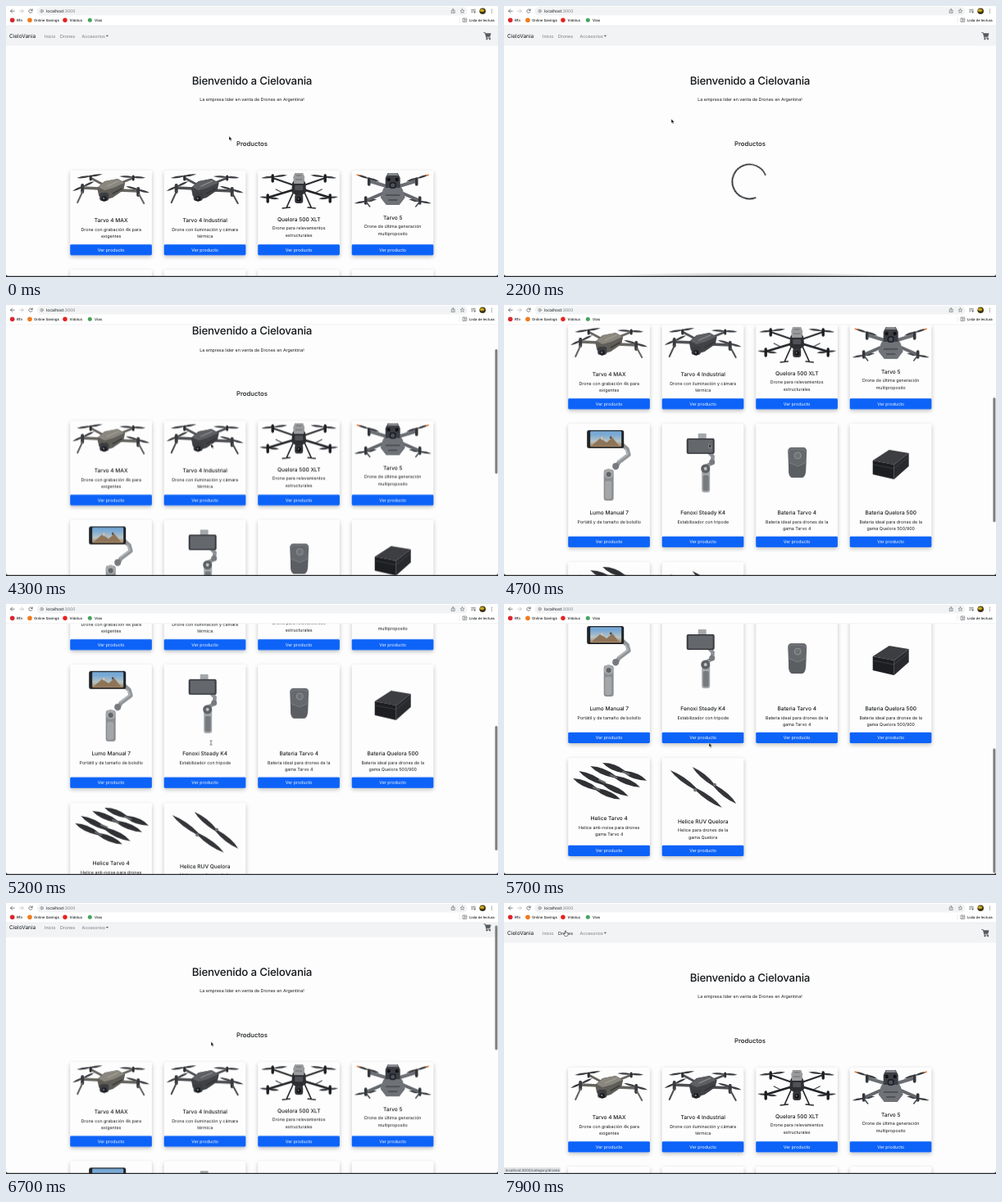
Write an HTML page that moves like this. It is 600 px wide and 331 px high and loops after 8 s.

```html
<!DOCTYPE html>
<html lang="es">
<head>
<meta charset="utf-8">
<title>CieloVania</title>
<style>
@property --scroll { syntax: "<number>"; inherits: true; initial-value: 0; }
html, body { margin: 0; width: 100%; height: 100%; overflow: hidden; background: #fdfdfd; }
svg { display: block; width: 100vw; height: 100vh; }
#stage { animation: scroll 8s linear infinite; }
text { font-family: Inter, "Open Sans", sans-serif; fill: #15181b; text-rendering: geometricPrecision; }
.mid { text-anchor: middle; }
.h1 { font-size: 13.33px; font-weight: 500; letter-spacing: -.22px; }
.h2 { font-size: 7.8px; font-weight: 500; }
.name { font-size: 6.55px; font-weight: 500; }
.body { font-size: 5.33px; }
.small { font-size: 4.35px; font-weight: 500; }
.muted { fill: #75777a; }
.white { fill: #fff; }
.card { fill: #fdfdfd; filter: drop-shadow(0 2.6px 2.8px rgba(0, 0, 0, .24)); }
.line { fill: none; stroke-linecap: round; stroke-linejoin: round; }

#page { transform: translateY(calc(var(--scroll) * -1px)); }
#thumb { transform: translateY(calc(var(--scroll) * .503px)); animation: thumb 8s linear infinite; }
#products { animation: loaded 8s step-end infinite; }
#loading { animation: loading 8s step-end infinite; }
#spinner { transform-origin: 299.5px 214.5px; animation: spin 8s linear infinite; }
#pointer { animation: move 8s linear infinite; }
#arrow { animation: arrow 8s step-end infinite; }
#beam { animation: beam 8s step-end infinite; }
#hand, #status { animation: hover 8s step-end infinite; }
#drones { animation: darken 8s step-end infinite; }

@keyframes scroll {
  0%, 50% { --scroll: 0; animation-timing-function: ease-in; }
  54% { --scroll: 66; }
  58.75% { --scroll: 177; }
  65% { --scroll: 248; animation-timing-function: ease-out; }
  70%, 72.5% { --scroll: 303; animation-timing-function: ease-in; }
  76.25% { --scroll: 207.5; animation-timing-function: ease-out; }
  85%, 100% { --scroll: 0; }
}
@keyframes thumb { 0%, 50% { opacity: 0; } 51%, 89% { opacity: 1; } 92%, 100% { opacity: 0; } }
@keyframes loaded { 0% { opacity: 1; } 16.25% { opacity: 0; } 42.5%, 100% { opacity: 1; } }
@keyframes loading { 0% { opacity: 0; } 16.25% { opacity: 1; } 42.5%, 100% { opacity: 0; } }
@keyframes spin { from { transform: rotate(-1033deg); } to { transform: rotate(2807deg); } }
@keyframes move {
  0%, 1.25% { transform: translate(272px, 159px); }
  5% { transform: translate(97px, 61px); animation-timing-function: ease-out; }
  8.75%, 18.75% { transform: translate(30px, 6px); animation-timing-function: ease-in-out; }
  27.5% { transform: translate(204px, 138px); animation-timing-function: ease-in-out; }
  37.5%, 86.25% { transform: translate(250px, 169.5px); animation-timing-function: ease-in-out; }
  95%, 100% { transform: translate(75px, 34px); }
}
@keyframes arrow { 0% { opacity: 1; } 63.5% { opacity: 0; } 67.5% { opacity: 1; } 95%, 100% { opacity: 0; } }
@keyframes beam { 0% { opacity: 0; } 63.5% { opacity: 1; } 67.5%, 100% { opacity: 0; } }
@keyframes hover { 0% { opacity: 0; } 95%, 100% { opacity: 1; } }
@keyframes darken { 0% { fill: #75777a; } 95%, 100% { fill: #15181b; } }
</style>
</head>
<body>
<svg id="stage" viewBox="0 0 600 331" preserveAspectRatio="none">
  <defs>
    <linearGradient id="photo" x2="0" y2="1">
      <stop offset=".2" stop-color="#78a9d6"/><stop offset=".65" stop-color="#b9c4c4"/><stop offset="1" stop-color="#a8825c"/>
    </linearGradient>
    <radialGradient id="dock"><stop stop-color="#777" stop-opacity=".65"/><stop offset=".6" stop-color="#999" stop-opacity=".35"/><stop offset="1" stop-color="#aaa" stop-opacity="0"/></radialGradient>
  </defs>
  <rect width="600" height="331" fill="#fdfdfd"/>

  <g id="page">
    <rect y="24" width="600" height="24.5" fill="#f1f3f5"/>
    <text x="4" y="38.8" style="font-size:6.5px">CieloVania</text>
    <g class="body">
      <text class="muted" x="47" y="38.6">Inicio</text>
      <text id="drones" x="66" y="38.6">Drones</text>
      <text class="muted" x="92.5" y="38.6">Accesorios</text>
    </g>
    <path d="M121.7 35.8h3.4l-1.7 1.9z" fill="#666"/>
    <g stroke="#55595d" fill="#55595d">
      <path class="line" d="M582.8 32.6h1.6l1.6 6.4h4.6" stroke-width=".9"/>
      <path d="M584.8 33.6h6.4l-1.1 3.9h-4.4z" stroke-width=".5"/>
      <circle cx="586.4" cy="40.2" r=".7"/><circle cx="590" cy="40.2" r=".7"/>
    </g>
    <text class="h1 mid" x="300" y="95.6">Bienvenido a Cielovania</text>
    <text class="body mid" x="300" y="116.2">La empresa lider en venta de Drones en Argentina!</text>
    <text class="h2 mid" x="300" y="170.6">Productos</text>
    <g id="products"></g>
  </g>

  <g id="loading">
    <path id="spinner" class="line" style="stroke-linecap:butt" stroke="#212529" stroke-width="1.7" d="M314.3 229.3A21 21 0 1 1 314.3 199.7"/>
    <ellipse cx="298" cy="331" rx="195" ry="6" fill="url(#dock)"/>
  </g>
  <rect id="thumb" x="596.4" y="24" width="3" height="152" rx="1.5" fill="#7d7d7d"/>

  <g id="toolbar">
    <rect width="600" height="24" fill="#fff"/>
    <path d="M0 23.8H600" stroke="#e3e5e8" stroke-width=".5"/>
    <rect x="37.5" y="1" width="525" height="10.4" rx="5.2" fill="#f1f3f4"/>
    <g class="line" stroke="#55585c" stroke-width=".75">
      <path d="M10.2 6.2H5.6M7.7 4L5.5 6.2l2.2 2.2"/>
      <path d="M16.6 6.2h4.6M19.1 4l2.2 2.2-2.2 2.2" stroke="#babcbe"/>
      <path d="M32 5.2A2.2 2.2 0 1 0 32 7.2M32.2 3.8v1.7h-1.7"/>
      <circle cx="43.6" cy="6.2" r="1.8" stroke-width=".5"/><path d="M43.6 6.1v.9M43.6 5.2v.05" stroke-width=".5"/>
      <path d="M544 5.5h-.8v3h4v-3h-.8M545.2 7.2V3.6M544.1 4.6l1.1-1.1 1.1 1.1" stroke-width=".55"/>
      <path d="M556.5 3.7l.75 1.6 1.75.2-1.3 1.2.35 1.7-1.55-.85-1.55.85.35-1.7-1.3-1.2 1.75-.2z" stroke-width=".5"/>
      <path d="M567.6 4.4h3.4M567.6 6h3.4M567.6 7.6h1.6M572 4v3.6" stroke-width=".6"/>
      <circle cx="571.4" cy="7.8" r=".5"/>
      <path d="M592.4 4.2v.05M592.4 6.2v.05M592.4 8.2v.05" stroke-width="1"/>
      <path d="M557.2 15h4.6v4.4h-4.6zM558.7 15v4.4M559.5 16.5h1.6M559.5 18h1.6" stroke-width=".5"/>
      <path d="M553 14v6.5" stroke="#d5d7da" stroke-width=".5"/>
    </g>
    <circle cx="581.2" cy="6.2" r="3.8" fill="#3d3616"/><ellipse cx="580.6" cy="5.4" rx="2.7" ry="1.8" fill="#c9a51c"/>
    <text x="49" y="8" style="font-size:5px">localhost<tspan class="muted">:3000</tspan></text>
    <circle cx="7.7" cy="17.2" r="2.8" fill="#d9272e"/>
    <circle cx="29" cy="17.2" r="2.8" fill="#f07a1b"/>
    <circle cx="72" cy="17.2" r="2.7" fill="#e8201c"/>
    <circle cx="102.3" cy="17.2" r="2.5" fill="#43a45c"/>
    <g class="small">
      <text x="13" y="18.8">Rfn</text><text x="34" y="18.8">Online Savings</text>
      <text x="77.5" y="18.8">Vidolux</text><text x="108" y="18.8">Vias</text>
      <text x="565" y="18.8" style="font-size:4.2px">Lista de lectura</text>
    </g>
  </g>

  <path d="M0 327.5Q0 329.8 2.5 329.8H597.5Q600 329.8 600 327.5V331H0z" fill="#25272a"/>
  <g id="status">
    <path d="M0 323H67.5Q69 323 69 324.5V330H0z" fill="#dfe2e6"/>
    <text class="small" x="1.8" y="328.2" style="fill:#44484e;font-weight:400">localhost:3000/category/drones</text>
  </g>

  <g id="pointer">
    <path id="arrow" d="M0 0V5.1L1.2 4.1 2 6 3 5.6 2.2 3.8H3.8z" fill="#111" stroke="#fff" stroke-width=".35"/>
    <path id="beam" class="line" d="M-1.2-2.6Q0-2.6 0-1.9Q0-2.6 1.2-2.6M0-1.9V1.9M-1.2 2.6Q0 2.6 0 1.9Q0 2.6 1.2 2.6" stroke="#333" stroke-width=".6"/>
    <path id="hand" d="M-.6 0Q0-.6.5 0V2.1Q2.6 2 3 3V4.8L2.2 6.4H-.8L-2.3 3.9Q-2.3 3-1.4 3.3L-.6 4z" fill="#fff" stroke="#111" stroke-width=".5"/>
  </g>
</svg>

<script>
const fill = (d, color) => `<path d="${d}" fill="${color}"/>`;
const line = (d, color, width) => `<path class="line" d="${d}" stroke="${color}" stroke-width="${width}"/>`;
const disc = (x, y, r, color) => `<circle cx="${x}" cy="${y}" r="${r}" fill="${color}"/>`;
const box = (x, y, w, h, r, color) => `<rect x="${x}" y="${y}" width="${w}" height="${h}" rx="${r}" fill="${color}"/>`;
const blade = (x, y, length, angle, width = 2.2, color = '#3a3c40') =>
  `<path transform="translate(${x} ${y}) rotate(${angle})" fill="${color}" d="M0 0Q${length * .25} ${-width} ${length / 2} ${-width * .2}Q${length * .8} ${-width} ${length} 0Q${length * .75} ${width} ${length / 2} ${width * .3}Q${length * .2} ${width} 0 0z"/>`;
const mirrored = shapes => shapes + `<g transform="translate(100 0) scale(-1 1)">${shapes}</g>`;

const foldingDrone = (top, side, arm) =>
  blade(8, 9, 32, -8) + blade(60, 7, 32, 3) + blade(3, 25, 29, -24) + blade(68, 19, 30, 16) +
  line('M40 17L25 9M62 15L77 9', arm, 2.6) + line('M25 7V11M77 7V11', '#2e3033', 3) +
  line('M36 22L15 21M60 24L83 25', arm, 3.6) +
  line('M15 18V26M83 22V30', '#393b3e', 4) + line('M15 26L9 39M84 29L90 40', arm, 2) +
  fill('M33 21L42 13 58 10 67 15 65 24 52 33 42 36 35 31z', side) +
  fill('M34 20L43 13 58 10 66 15 53 21 42 24z', top) +
  line('M45 19L59 13', '#b5b3ad', .7) + line('M52 28L63 22', '#2f3134', 1.2) +
  box(36, 27, 11, 10, 3, '#3b3d41') + disc(41.5, 34.5, 3.2, '#191b1e') + disc(41, 34, 1.2, '#68717c');

const sixArm =
  mirrored(blade(4, 9, 32, -6) + blade(2, 32, 24, 6) +
    line('M44 18L18 9', '#2b2d30', 2) + line('M45 23L12 33', '#222427', 2.8) +
    line('M44 25L35 45M30 46L39 45', '#26282b', 1.7) +
    line('M18 6V13M12 30V38', '#1d1f22', 3.4) + line('M30 27L22 23', '#3c3e42', 1.2)) +
  fill('M42 15L45 10H55L58 15 59 26 54 30H46L41 26z', '#2c2e31') +
  fill('M43 8L45 3H55L57 8 56 16H44z', '#9b9c9d') + line('M47 6H53M46 11H54', '#6a6c6f', 1) +
  box(45, 18, 10, 6, 1, '#505257') + box(45, 29, 10, 11, 3, '#34363a') +
  disc(50, 35, 2.8, '#111') + disc(49.5, 34.5, 1, '#777c84');

const frontDrone =
  mirrored(blade(6, 5, 29, 17) + blade(3, 40, 28, -10) +
    line('M6.5 5.2L9 6', '#e8742c', 1.5) +
    line('M42 19L22 13', '#6b6e73', 4) + line('M42 26L19 36', '#64676c', 4) +
    line('M21 10V17M17 33V40', '#34373c', 3.6) + line('M18 39L22 44', '#4c4f54', 1.6)) +
  fill('M38 23L42 17H58L62 23 65 33 58 42H42L35 33z', '#6f7277') +
  fill('M41 9L44 3H56L59 9 59 21H41z', '#3c3e43') + fill('M43 6L45 3H55L57 6z', '#85888d') +
  disc(45, 11, 2.2, '#101216') + disc(55, 11, 2.2, '#101216') + box(46, 14, 8, 8, 3, '#1b1d21') +
  disc(50, 18, 2.6, '#4b525e') + line('M42 30H58M45 36H55', '#45484d', 1.6);

const phoneGimbal =
  line('M65 25L72 31 74 38 62 47 58 54', '#929598', 5) + line('M70 31L73 37 61 46', '#babcbf', 1.4) +
  box(23, 8, 45, 22, 2.5, '#202327') + box(27, 9.3, 38, 19, 1, 'url(#photo)') +
  fill('M32 24L39 18 47 23 54 17 62 27H29z', '#8e7458') + disc(41, 18, 1.4, '#e3c3a5') + disc(52, 17, 1.4, '#594942') +
  box(43.5, 56, 12, 38, 3, '#8b8e91') + box(45, 70, 8, 22, 2, '#a4a6a8') +
  disc(49.5, 61, 6, '#a6a8aa') + disc(49.5, 62, 3, '#606367') + disc(58, 52, 4, '#777a7e');

const smallGimbal =
  line('M57 35L62 40 61 48 54 52', '#8d9094', 4.5) +
  box(44, 12, 10, 9, 1, '#a5a8ab') + box(30, 18, 34, 19, 2, '#383b3f') + box(32, 19.5, 30, 16, 1, '#64676c') +
  box(48.5, 52, 10, 32, 3, '#a4a7aa') + box(50, 63, 7, 19, 2, '#777a7e') +
  disc(53, 55, 5.5, '#5d6064') + disc(53, 55, 2, '#c1c3c5') + disc(61, 47, 3.5, '#777a7e');

const roundBattery =
  fill('M43 29H58Q61 29 62 33L61 58Q60 66 56 66H45Q41 66 40 58L39 33Q40 29 43 29z', '#65686c') +
  fill('M40 48L51 52 61 48 60 60Q59 66 55 66H45Q41 66 40 60z', '#5a5d62') +
  line('M40 34L43 31H57L61 34M41 48L51 52 60 48', '#888b8f', .7) +
  `<circle cx="51" cy="39" r="4" fill="#6e7276" stroke="#a2a5a8" stroke-width=".7"/>`;

const boxBattery =
  fill('M28 45L48 32 72 36 54 50z', '#3d3e41') + fill('M28 45L54 50V68L28 62z', '#1d1e21') +
  fill('M54 50L72 36V52L54 68z', '#292a2e') + line('M29 50L54 55 71 41', '#505156', .6);

const bladeSet = [[6, 25, 63, 24], [13, 16, 68, 27], [27, 10, 66, 23], [42, 6, 58, 22]]
  .map(([x, y, length, angle]) => blade(x, y, length, angle, 6, '#303135') +
    line(`M${x + 25} ${y + 11}l7 3`, '#6a6b6f', 2.4)).join('');
const bladePair = [[10, 15, 78, 36], [37, 11, 70, 40]]
  .map(([x, y, length, angle]) => blade(x, y, length, angle, 5, '#34363a') +
    disc(x + length * .39, y + length * .31, 2, '#6d7075')).join('');

// Each product: picture, name, two lines of text, centre of the name inside the card.
const products = [
  [foldingDrone('#8a877f', '#5f5d58', '#66645f'), 'Tarvo 4 MAX', 'Drone con grabación 4k para', 'exigentes', 61],
  [foldingDrone('#5d5f63', '#404246', '#4d4f53'), 'Tarvo 4 Industrial', 'Drone con iluminación y cámara', 'térmica', 61],
  [sixArm, 'Quelora 500 XLT', 'Drone para relevamientos', 'estructurales', 59.5],
  [frontDrone, 'Tarvo 5', 'Drone de última generación', 'multiproposito', 57.3],
  [phoneGimbal, 'Lumo Manual 7', 'Portátil y de tamaño de bolsillo', '', 109],
  [smallGimbal, 'Fenoxi Steady K4', 'Estabilizador con tripode', '', 109],
  [roundBattery, 'Bateria Tarvo 4', 'Bateria ideal para drones de la', 'gama Tarvo 4', 109],
  [boxBattery, 'Bateria Quelora 500', 'Bateria ideal para drones de la', 'gama Quelora 500/900', 109],
  [bladeSet, 'Helice Tarvo 4', 'Helice anti-noise para drones', 'gama Tarvo 4', 74],
  [bladePair, 'Helice RUV Quelora', 'Helice para drones de la', 'gama Quelora', 77.5]
];
const rows = [[201, 103.5], [322, 151], [491, 120]];
const label = (style, y, text) => `<text class="${style} mid" x="50" y="${y}">${text}</text>`;

document.getElementById('products').innerHTML = products.map(([picture, name, first, second, y], i) => {
  const [top, height] = rows[Math.floor(i / 4)];
  return `<g transform="translate(${78.2 + i % 4 * 114.5} ${top})">
    <rect class="card" width="99.7" height="${height}" rx="1.6"/>${picture}
    ${label('name', y + 2.4, name)}${label('body', y + 12.8, first)}${label('body', y + 21.4, second)}
    ${box(0, height - 13.2, 99.7, 13.2, 1.4, '#0d63f8')}${label('body white', height - 4.7, 'Ver producto')}
  </g>`;
}).join('');
</script>
</body>
</html>
```
